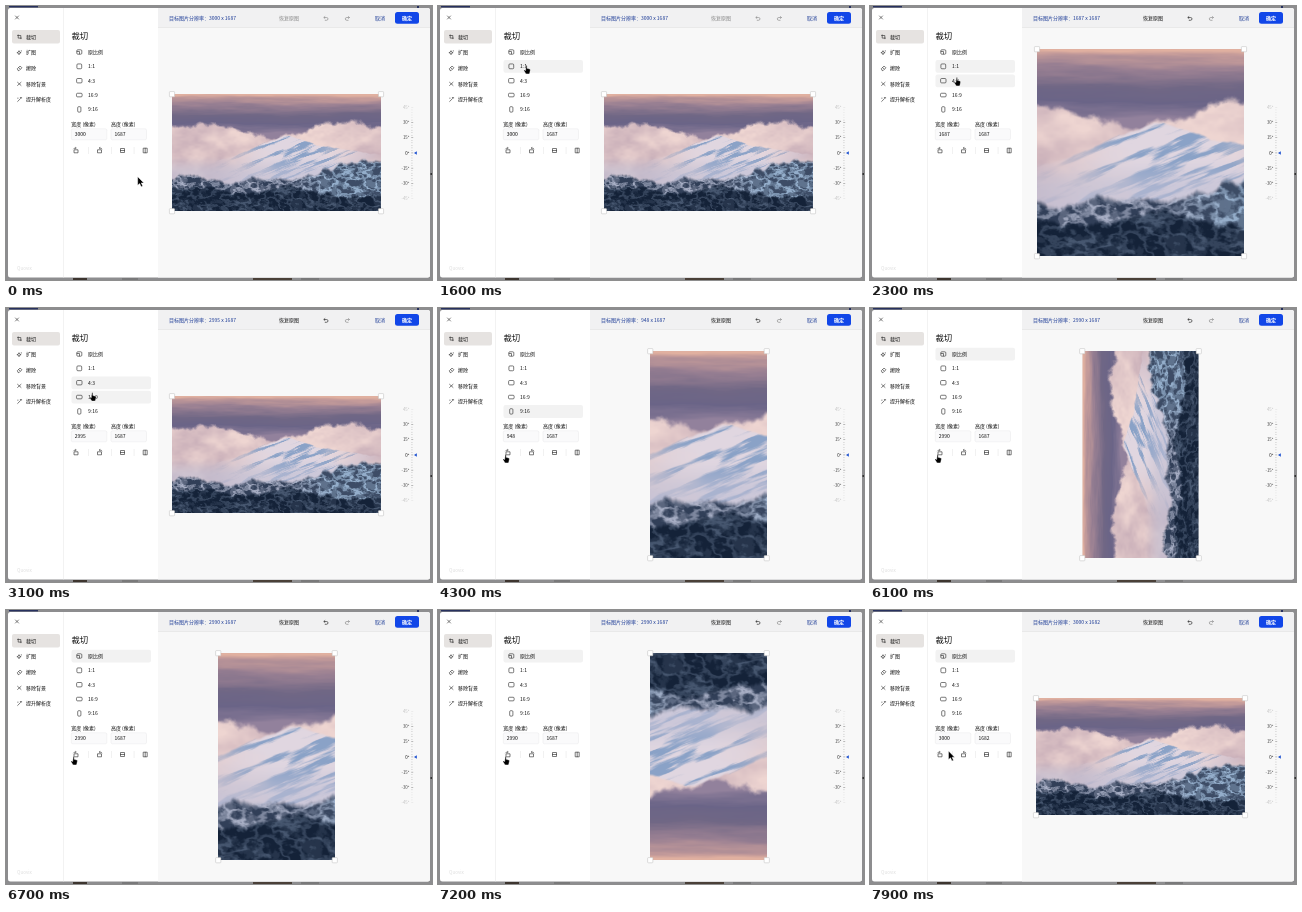
An HTML page with a canvas that plays this animation: 426 px wide and 274 px high, repeating every 8 s.

```html
<!DOCTYPE html>
<html lang="zh-CN">
<head>
<meta charset="utf-8">
<title>裁切</title>
<style>
html, body { margin: 0; width: 100%; height: 100%; overflow: hidden; background: #8d8d8f; }
svg, #crop { position: absolute; left: 0; top: 0; }
svg { width: 426px; height: 274px; }
#crop { overflow: hidden; }
#crop canvas { position: absolute; left: 50%; top: 50%; width: 209px; height: 117px; margin: -58.5px 0 0 -104.5px; }
text { font: 500 5px "Noto Sans CJK SC", "Noto Sans CJK", "Noto Sans", sans-serif; fill: #111; white-space: pre; }
.icon { fill: none; stroke: #333; stroke-width: .65; stroke-linejoin: round; }
</style>
</head>
<body>
<svg id="ui" viewBox="0 0 426 274"></svg>
<div id="crop"><canvas width="627" height="351"></canvas></div>
<svg id="top" viewBox="0 0 426 274"></svg>
<script>
const LOOP = 8000, ART_W = 209, ART_H = 117;
const CENTER = { x: 270.5, y: 146.7 };
const $ = id => document.getElementById(id);
const clamp = v => Math.max(0, Math.min(1, v));
const smooth = (a, b, v) => { const u = clamp((v - a) / (b - a)); return u * u * (3 - 2 * u); };
const lerp = (a, b, u) => a + (b - a) * u;
const blend = (a, b, u) => a.map((v, i) => lerp(v, b[i], u));

// Piecewise linear lookup in [[key, value], ...]; values are numbers or colours
function along(stops, k) {
  let i = 0;
  while (i < stops.length - 2 && k > stops[i + 1][0]) i++;
  const [[k0, a], [k1, b]] = [stops[i], stops[i + 1]];
  const u = clamp((k - k0) / (k1 - k0));
  return Array.isArray(a) ? blend(a, b, u) : lerp(a, b, u);
}

function hash(x, y) {
  let h = Math.imul(x, 374761393) + Math.imul(y, 668265263);
  h = Math.imul(h ^ (h >>> 13), 1274126177);
  return ((h ^ (h >>> 16)) >>> 0) / 4294967295;
}
function noise(x, y) {
  const xi = Math.floor(x), yi = Math.floor(y);
  const u = smooth(0, 1, x - xi), v = smooth(0, 1, y - yi);
  return lerp(lerp(hash(xi, yi), hash(xi + 1, yi), u),
              lerp(hash(xi, yi + 1), hash(xi + 1, yi + 1), u), v);
}
function fbm(x, y) {
  let sum = 0;
  for (let i = 0, amp = .53; i < 4; i++, amp /= 2) {
    sum += amp * noise(x, y);
    x = x * 2 + 17; y = y * 2 + 31;
  }
  return sum;
}
const crease = (x, y) => 1 - Math.abs(2 * fbm(x, y) - 1);

const SKY = [[0, [224, 176, 160]], [4, [198, 156, 154]], [11, [152, 127, 146]], [20, [112, 103, 133]],
             [30, [106, 100, 135]], [40, [146, 129, 156]]];
const CLOUD_TOP = [[0, 32], [35, 31], [70, 36], [95, 44], [125, 40], [150, 29], [180, 27], [209, 31]];
const PEAK = [[0, 78], [40, 68], [72, 58], [98, 46], [112, 41], [122, 43], [150, 52], [209, 60]];
const ROCK_TOP = [[0, 83], [25, 82], [55, 88], [80, 82], [104, 85], [130, 85], [150, 77], [180, 67], [209, 66]];
const RIDGE = [[0, 92], [40, 94], [70, 100], [100, 95], [118, 91], [140, 97], [175, 103], [209, 101]];

function scenery(x, y) {
  const fine = fbm(x / 6, y / 6), broad = fbm(x / 24 + 9, y / 15);
  let c = along(SKY, y + (fbm(x / 38, y / 4) - .5) * 9);

  const top = along(CLOUD_TOP, x) + (fbm(x / 13, 4) - .5) * 8;
  const mist = blend([200, 174, 184], [238, 213, 209], clamp(broad * 1.8 - .3));
  c = blend(c, mist, smooth(top - 2, top + 3, y + (fine - .5) * 7));

  const ridge = along(PEAK, x) + (fbm(x / 9, 60) - .5) * 3;
  const veil = smooth(82, 25, Math.abs(x - 125) + (broad - .5) * 50);
  const streak = fbm((x + y * 1.1) / 14, (y + x * .35) / 4);
  const snow = blend([138, 162, 199], [224, 214, 224], smooth(.3, .5, streak));
  c = blend(c, snow, smooth(ridge - .5, ridge + 1.5, y) * veil);
  c = blend(c, [190, 190, 212], smooth(60, 80, y) * .6);

  // Snowy foothills, bluer on the right, behind a dark front ridge
  const right = smooth(105, 165, x);
  const edge = along(ROCK_TOP, x) + (fbm(x / 8, 90) - .5) * 8;
  const front = along(RIDGE, x) + (fbm(x / 5, 120) - .5) * 6;
  const crag = crease((x - y * .6) / 9, (y + x * .2) / 6 + 40);
  const frost = smooth(.7, .98, crag) * .65 + smooth(.48, .66, fine) * .35;
  const hill = blend([49, 63, 88], blend([168, 175, 197], [147, 173, 202], right), clamp(frost + right * .12));
  const near = blend([20, 34, 56], [112, 130, 157], frost * .55);
  c = blend(c, hill, smooth(edge - 1.5, edge + 3, y));
  return blend(c, near, smooth(front - 1, front + 2, y));
}

function paintScenery(canvas) {
  const ctx = canvas.getContext('2d'), { width, height } = canvas;
  const img = ctx.createImageData(width, height);
  for (let j = 0, p = 0; j < height; j++) {
    for (let i = 0; i < width; i++, p += 4) {
      const c = scenery(i * ART_W / width, j * ART_H / height);
      img.data.set([c[0], c[1], c[2], 255], p);
    }
  }
  ctx.putImageData(img, 0, 0);
}

const rect = (x, y, w, h, fill, r = 0, more = '') =>
  `<rect x="${x}" y="${y}" width="${w}" height="${h}" rx="${r}" fill="${fill}" ${more}/>`;
const text = (x, y, s, more = '') => `<text x="${x}" y="${y}" ${more}>${s}</text>`;
const icon = (x, y, d, more = '') => `<path class="icon" transform="translate(${x} ${y})" d="${d}" ${more}/>`;
const box = (w, h) => `M${-w / 2} ${-h / 2}h${w}v${h}h${-w}z`;
const roundBox = (w, h) => `M${1 - w / 2} ${-h / 2}h${w - 2}q1 0 1 1v${h - 2}q0 1-1 1h${2 - w}q-1 0-1-1v${2 - h}q0-1 1-1z`;

const rowY = i => 46 + 14.35 * i;
const OPTIONS = [['原比例', roundBox(5, 4.4) + 'M-2.5 -.5h2.7v2.7'], ['1:1', roundBox(4.8, 4.8)],
                 ['4:3', roundBox(5.4, 4.4)], ['16:9', roundBox(5.6, 3.6)], ['9:16', roundBox(3.2, 5.4)]];
const TOOLS = [['裁切', 'M-1.3 -2.3v3.6h3.6M-2.3 -1.3h3.6v3.6'],
               ['扩图', 'M-.5 -1.8l.6 1.4 1.5.6-1.5.6-.6 1.4-.6-1.4-1.5-.6 1.5-.6zM1.8 -2.2v1.2'],
               ['擦除', 'M-2.2 .6l2.8-2.8 1.8 1.8-2.8 2.8h-.9zM-1 -.8l1.8 1.8'],
               ['移除背景', 'M-2.2 -1.8l4 3.6M-2.2 1.8l4-3.6'],
               ['提升解析度', 'M-2.1 2.1l3.1-3.1M1.4 -2.4v1.2M.4 -1.8h2.2M-1.6 -2v1.2']];
const ROTATE = 'M-2 -.5h4v3h-4zM-2.6 -1.1q.6-1.4 2.8-1.2l-.8-.7m.8.7l-.8.7';
const ANGLES = [45, 30, 15, 0, -15, -30, -45];

function buildUi() {
  const parts = [
    rect(0, 0, 426, 274, '#8d8d8f'), rect(3, 0, 29, 1.4, '#27315f'), rect(411, 0, 2, 3, '#27315f'),
    rect(67, 272, 14, 2, '#3d352f'), rect(116, 272.5, 16, 1, '#666'),
    rect(247, 272, 39, 2, '#4a4038'), rect(295, 272.5, 18, 1, '#666'), rect(424.5, 167, 1.5, 2, '#333'),
    rect(2, 2, 422, 269.5, '#fff', 2.5),
    '<path d="M152 2h269.5q2.5 0 2.5 2.5v264.5q0 2.5-2.5 2.5h-269.5z" fill="#f8f8f8"/>',
    '<path d="M152 2h269.5q2.5 0 2.5 2.5v17h-272z" fill="#f1f1f2"/>',
    rect(152, 21.3, 272, .6, '#e2e2e3'), rect(57.2, 2, .6, 269.5, '#e9e9e9'),
    icon(11, 11.5, 'M-1.8 -1.8l3.6 3.6M-1.8 1.8l3.6-3.6'),
    rect(6, 24, 48, 13.5, '#e6e3e1', 2),
    text(65.5, 32.5, '裁切', 'style="font-size:8.4px"'),
    text(11, 264, 'Quovix', 'style="font-size:4.6px;fill:#ddd"'),
  ];
  TOOLS.forEach(([name, d], i) => {
    const y = 30.8 + 15.7 * i;
    parts.push(icon(13.5, y, d), text(20, y + 1.8, name));
  });
  OPTIONS.forEach(([name, d], i) => {
    const y = rowY(i);
    parts.push(rect(65.5, y - 6.3, 79.5, 12.8, '#f2f2f2', 2, `id="row${i}"`),
      icon(73.3, y, d), text(82, y + 1.8, name));
  });
  [['宽度 (像素)', 65.3, 'w'], ['高度 (像素)', 105, 'h']].forEach(([label, x, id]) =>
    parts.push(text(x, 119.5, label), rect(x, 122.8, 35.5, 11, '#fafafb', 1.5, 'stroke="#ebebec" stroke-width=".6"'),
      text(x + 3.5, 130.2, '', `id="${id}"`)));
  parts.push(icon(70, 144.3, ROTATE), icon(93.5, 144.3, ROTATE, 'style="transform:translate(93.5px,144.3px) scaleX(-1)"'),
    icon(116.5, 144.5, box(4, 4) + 'M-2.4 0h4.8'), icon(139.2, 144.5, box(4, 4.6) + 'M0 -2.6v5.2'));
  [82, 105.3, 127.8].forEach(x => parts.push(rect(x, 141, .5, 7, '#e2e2e2')));

  parts.push(text(163, 13.8, '', 'id="size" style="fill:#1c3b96"'),
    text(273, 13.8, '恢复原图', 'id="restore"'),
    icon(320, 12.3, 'M-.8 -2l-1.4 1.2 1.4 1.2M-2.2 -.8h2.6q1.6 0 1.6 1.4t-1.6 1.4h-1.6', 'id="undo"'),
    icon(341.3, 12.3, 'M.8 -2l1.4 1.2-1.4 1.2M2.2 -.8h-2.6q-1.6 0-1.6 1.4t1.6 1.4h1.6', 'style="stroke:#888"'),
    text(369, 13.8, '取消', 'style="fill:#1c3b96"'),
    rect(389, 6, 24, 11.8, '#1146e8', 2.5),
    text(401, 13.8, '确定', 'text-anchor="middle" style="fill:#fff;font-weight:700"'));

  ANGLES.forEach((a, i) => {
    const fill = ['#222', '#444', '#555', '#c4c4c4'][Math.abs(a) / 15];
    parts.push(text(403.3, 103 + 15.2 * i, a + '°', `text-anchor="end" style="font-size:4.3px;fill:${fill}"`));
  });
  for (let i = -18; i <= 18; i++) {
    const major = i % 6 === 0;
    parts.push(rect(405.2, CENTER.y + i * 2.53, major ? 2 : 1.4, .5, Math.abs(i) > 13 ? '#ddd' : major ? '#777' : '#b5b5b5'));
  }
  parts.push('<path d="M408 147l2.8-1.7v3.4z" fill="#1a4fd0"/>');
  $('ui').innerHTML = parts.join('');

  const arrow = 'M0 0v8.6l2-1.8 1.5 3.2 1.5-.7-1.5-3.1h2.6z';
  const hand = 'M-.6 -.5q.8-.6 1 .2v2.6l2.5.7q.8.3.7 1.1l-.5 2.5-.5 1.3h-3.3l-2.2-3.4q.3-1 1.8 0z';
  $('top').innerHTML = '<g id="corners"></g><g id="cursor" stroke="#fff" stroke-width=".4">' +
    `<path id="arrow" d="${arrow}"/><path id="hand" d="${hand}"/></g>`;
}

const STEPS = [
  { at: 0, w: 3000, h: 1687, bw: 209, bh: 117 },
  { at: 1750, w: 1687, h: 1687, bw: 207, bh: 207 },
  { at: 2400, w: 2249, h: 1687, bw: 209, bh: 157 },
  { at: 3050, w: 2995, h: 1687, bw: 209, bh: 117 },
  { at: 3750, w: 948, h: 1687, bw: 116.5, bh: 207 },
];
const SELECTED = [[0, -1], [1750, 1], [2400, 2], [3200, 3], [3750, 4], [5020, 0]];
const PATH = [[0, 131.7, 170.7], [900, 131.7, 170.7], [1450, 88.7, 60], [1900, 88.7, 60], [2250, 87, 72],
              [2700, 87, 72], [2980, 86.5, 85.2], [3350, 86.5, 85.2], [3600, 86.5, 100], [3900, 86.5, 100],
              [4200, 67.8, 147], [7700, 67.8, 147], [7860, 78.5, 141]];
const SPIN = { start: 5020, every: 235, lag: 110, count: 12 };

const lastBefore = (list, t, key) => list.filter(s => key(s) <= t).pop();

function turnsAt(t) {
  return Math.max(0, Math.min(SPIN.count, Math.floor((t - SPIN.start) / SPIN.every) + 1));
}

// The picture turns at once; its frame follows a moment later
function stateAt(t) {
  const settled = turnsAt(t - SPIN.lag);
  if (!settled) return lastBefore(STEPS, t, s => s.at);
  return settled % 2 ? { w: 2990, h: 1687, bw: 116.5, bh: 207 } : { w: 3000, h: 1682, bw: 209, bh: 117 };
}

function cursorAt(t) {
  const i = Math.max(0, PATH.findIndex(p => p[0] > t) - 1);
  const [a, b] = t >= PATH.at(-1)[0] ? [PATH.at(-1), PATH.at(-1)] : [PATH[i], PATH[i + 1]];
  const u = smooth(a[0], b[0] + .001, t);
  return [lerp(a[1], b[1], u), lerp(a[2], b[2], u)];
}

function draw(t) {
  const { w, h, bw, bh } = stateAt(t), turns = turnsAt(t);
  const x = CENTER.x - bw / 2, y = CENTER.y - bh / 2;
  const [rw, rh] = turns % 2 ? [ART_H, ART_W] : [ART_W, ART_H];
  const zoom = Math.max(bw / rw, bh / rh);
  Object.assign($('crop').style, { left: x + 'px', top: y + 'px', width: bw + 'px', height: bh + 'px' });
  art.style.transform = `rotate(${-90 * turns}deg) scale(${zoom})`;
  $('corners').innerHTML = [[x, y], [x + bw, y], [x, y + bh], [x + bw, y + bh]]
    .map(([cx, cy]) => rect(cx - 2.6, cy - 2.6, 5.2, 5.2, '#fff', .6, 'stroke="#bbb" stroke-width=".5"')).join('');

  $('w').textContent = w;
  $('h').textContent = h;
  $('size').textContent = `目标图片分辨率：${w} x ${h}`;
  const edited = t >= STEPS[1].at;
  $('restore').style.fill = edited ? '#111' : '#888';
  $('undo').style.stroke = edited ? '#222' : '#888';

  const [cx, cy] = cursorAt(t);
  const hover = OPTIONS.findIndex((_, i) => cx > 66 && cx < 145 && Math.abs(cy - rowY(i)) < 6.5);
  const selected = lastBefore(SELECTED, t, s => s[0])[1];
  OPTIONS.forEach((_, i) => $('row' + i).setAttribute('opacity', i === selected || i === hover ? 1 : 0));
  const pointing = hover >= 0 || (cx < 75 && cy > 138);
  $('cursor').setAttribute('transform', `translate(${cx} ${cy})`);
  $('hand').setAttribute('opacity', pointing ? 1 : 0);
  $('arrow').setAttribute('opacity', pointing ? 0 : 1);
}

const art = document.querySelector('canvas');
buildUi();
paintScenery(art);
const began = performance.now();
function tick() {
  draw((performance.now() - began) % LOOP);
  requestAnimationFrame(tick);
}
tick();
</script>
</body>
</html>
```
